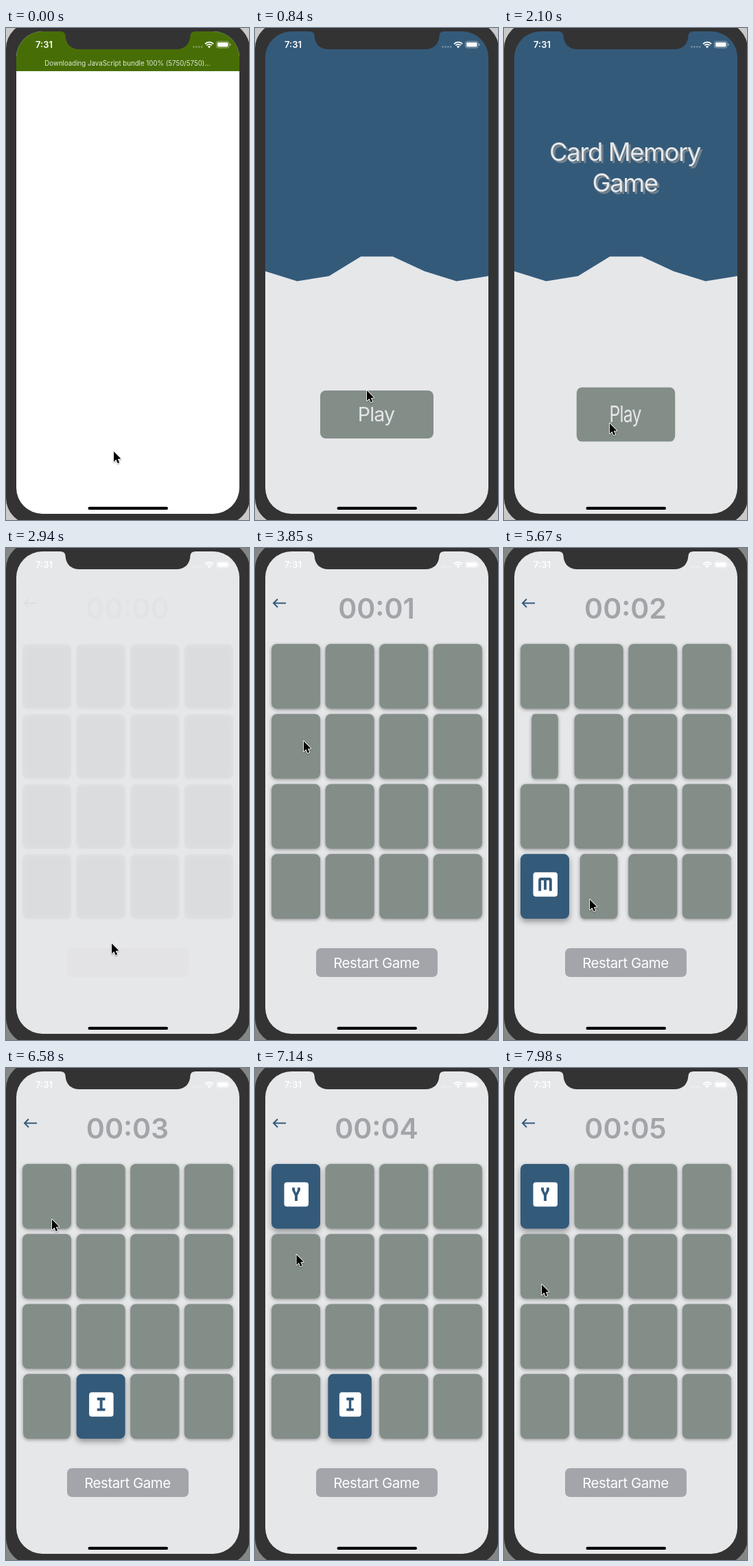
An HTML page with a canvas for the animation above (8 s loop, 354x718 px).

```html
<!DOCTYPE html>
<html lang="en">
<head>
<meta charset="utf-8">
<title>Card Memory Game</title>
<style>
html, body { margin: 0; width: 100%; height: 100%; overflow: hidden; background: #333334; }
canvas { display: block; width: 354px; height: 718px; }
</style>
</head>
<body>
<canvas id="stage"></canvas>
<script>
const W = 354, H = 718, LOOP = 8000;
const BLUE = '#345a7a', PALE = '#e6e7e9', SAGE = '#848e89', GRAY = '#a3a4a9', BEZEL = '#333334';
const canvas = document.getElementById('stage');
const dpr = window.devicePixelRatio || 1;
canvas.width = W * dpr;
canvas.height = H * dpr;
const c = canvas.getContext('2d');

const clamp = v => Math.min(1, Math.max(0, v));
const part = (t, from, length) => clamp((t - from) / length);
const easeInOut = p => p < .5 ? 2 * p * p : 1 - 2 * (1 - p) ** 2;
const easeOut = p => 1 - (1 - p) ** 3;

// time, x, y of the pointer tip
const POINTER = [
  [0, 157, 618], [140, 157, 618], [700, 163, 529], [980, 163, 529], [1640, 154, 577],
  [2940, 154, 577], [3700, 71, 282], [3960, 71, 282], [4600, 62, 505], [4800, 62, 505],
  [5400, 125, 513], [5750, 125, 513], [6500, 67, 221], [6750, 67, 221], [7500, 55, 316], [8000, 55, 316]
];
// progress, scaleX (scaleY is 2 - scaleX)
const RUBBER = [[0, 1], [.3, 1.25], [.4, .75], [.5, 1.15], [.65, .95], [.75, 1.05], [1, 1]];
const GLYPHS = {
  K: 'M9 7H11V11L13 7H15L12.5 12L15 17H13L11 13V17H9Z',
  M: 'M9 7A2 2 0 0 0 7 9V17H9V9H11V16H13V9H15V17H17V9A2 2 0 0 0 15 7Z',
  I: 'M9 7V9H11V15H9V17H15V15H13V9H15V7Z',
  Y: 'M9 7V9L11 13V17H13V13L15 9V7H13V9L12 11L11 9V7Z'
};
for (const k in GLYPHS) GLYPHS[k] = new Path2D(GLYPHS[k]);
const TURNS = [
  { col: 0, row: 1, glyph: 'K', at: 3870 },
  { col: 0, row: 3, glyph: 'M', at: 4680 },
  { col: 1, row: 3, glyph: 'I', at: 5505 },
  { col: 0, row: 0, glyph: 'Y', at: 6600 }
];
const FLIP = 500, SHOWN = 1500, TAP = 1671, GAME = 2660;

function track(keys, t, i, ease = p => p) {
  let n = 1;
  while (n < keys.length - 1 && keys[n][0] < t) n++;
  const a = keys[n - 1], b = keys[n];
  return a[i] + (b[i] - a[i]) * ease(part(t, a[0], b[0] - a[0]));
}

function box(x, y, w, h, r, fill) {
  c.beginPath();
  c.roundRect(x, y, w, h, r);
  c.fillStyle = fill;
  c.fill();
}

function label(str, x, y, size, fill, { weight = 400, align = 'center', gap = 0 } = {}) {
  c.font = `${weight} ${size}px Inter, "Open Sans", sans-serif`;
  c.letterSpacing = gap * size + 'px';
  c.textAlign = align;
  c.fillStyle = fill;
  c.fillText(str, x, y);
}

function shadow(color, blur, y, x = 0) {
  c.shadowColor = color;
  c.shadowBlur = blur * dpr;
  c.shadowOffsetX = x * dpr;
  c.shadowOffsetY = y * dpr;
}

function loading(t) {
  c.fillStyle = '#fff';
  c.fillRect(0, 0, W, H);
  c.globalAlpha = 1 - part(t, 280, 280);
  c.fillStyle = '#476e06';
  c.fillRect(0, 0, W, 63);
  label('Downloading JavaScript bundle 100% (5750/5750)...', 177, 55, 9.7, '#e2ead8');
  c.globalAlpha = 1;
}

function home(t) {
  c.fillStyle = BLUE;
  c.fillRect(0, 0, W, 380);
  c.beginPath();
  c.moveTo(15, H);
  [355, 369.5, 362, 333.5, 333.5, 355, 369.5, 362].forEach((y, i) => c.lineTo(15 + i * 325 / 7, y));
  c.lineTo(340, H);
  c.fillStyle = PALE;
  c.fill();

  if (t > 980) {
    const dy = -245 * (1 - easeOut(part(t, 980, 680)));
    c.save();
    shadow('#7b868d', 1, 3, 3);
    label('Card Memory', 176, 194 + dy, 36.5, PALE, { gap: -.04 });
    label('Game', 176, 239 + dy, 36.5, PALE, { gap: -.04 });
    c.restore();
  }

  const sx = track(RUBBER, part(t, TAP, 1000), 1);
  c.save();
  c.translate(177.5, 564);
  c.scale(sx, 2 - sx);
  box(-82.5, -35, 165, 70, 8, SAGE);
  label('Play', -1, 10, 28.5, PALE, { gap: -.03 });
  c.restore();
}

function card(col, row, t) {
  const turn = TURNS.find(k => k.col === col && k.row === row);
  let p = 0;
  if (turn) p = easeInOut(part(t, turn.at, FLIP)) - easeInOut(part(t, turn.at + SHOWN, FLIP));
  const open = p > .5;
  c.save();
  c.translate(59.5 + col * 78.6, 187.2 + row * 102.2);
  c.scale(Math.max(.01, Math.abs(Math.cos(p * Math.PI))), 1);
  shadow('rgba(0,0,0,.38)', open ? 9 : 5, open ? 4 : 1.5);
  box(-35.5, -47.2, 71, 94.4, 8, open ? BLUE : SAGE);
  shadow('transparent', 0, 0);
  if (open) {
    box(.5 - 17.5, -20.5, 35.5, 35.5, 4, '#fff');
    c.translate(.5, -3);
    c.scale(1.96, 1.96);
    c.translate(-12, -12);
    c.fillStyle = BLUE;
    c.fill(GLYPHS[turn.glyph]);
  }
  c.restore();
}

function game(t) {
  c.fillStyle = PALE;
  c.fillRect(0, 0, W, H);
  c.globalAlpha = part(t, 2900, 700);
  if (!c.globalAlpha) {
    c.globalAlpha = 1;
    return;
  }
  c.strokeStyle = BLUE;
  c.lineWidth = 2;
  c.beginPath();
  c.moveTo(45, 80.5);
  c.lineTo(27.5, 80.5);
  c.moveTo(33, 74.5);
  c.lineTo(27, 80.5);
  c.lineTo(33, 86.5);
  c.stroke();

  const secs = Math.floor((t - GAME) / 1020);
  label('00:0' + secs, 177, 103, 41, GRAY, { weight: 600 });
  for (let row = 0; row < 4; row++)
    for (let col = 0; col < 4; col++) card(col, row, t);
  box(89, 584, 177, 42, 7, '#a4a5ab');
  label('Restart Game', 177, 613, 20.4, '#fff', { gap: -.02 });
  c.globalAlpha = 1;
}

function statusBar() {
  label('7:31', 43, 29, 13, '#fff', { weight: 600, align: 'left' });
  c.fillStyle = 'rgba(255,255,255,.35)';
  for (let i = 0; i < 4; i++) {
    c.beginPath();
    c.arc(273.5 + i * 3.9, 27.5, 1.3, 0, 7);
    c.fill();
  }
  c.strokeStyle = '#fff';
  c.lineWidth = 1.8;
  for (const r of [8.3, 5.2]) {
    c.beginPath();
    c.arc(296, 29, r, -Math.PI * .76, -Math.PI * .24);
    c.stroke();
  }
  c.beginPath();
  c.moveTo(296, 29.3);
  c.arc(296, 29.3, 3, -Math.PI * .75, -Math.PI * .25);
  c.fillStyle = '#fff';
  c.fill();
  c.strokeStyle = 'rgba(255,255,255,.45)';
  c.lineWidth = 1;
  c.beginPath();
  c.roundRect(306.5, 19.5, 18.5, 9.5, 2.6);
  c.stroke();
  box(308, 21, 15.5, 6.5, 1.4, '#fff');
  box(326, 22.5, 1.4, 3.5, .7, 'rgba(255,255,255,.5)');
}

function notch() {
  c.beginPath();
  c.moveTo(79, 0);
  c.lineTo(79, 5);
  c.quadraticCurveTo(86, 5, 86.5, 11);
  c.bezierCurveTo(87, 24, 95, 31, 107, 31);
  c.lineTo(248, 31);
  c.bezierCurveTo(260, 31, 268, 24, 268.5, 11);
  c.quadraticCurveTo(269, 5, 276, 5);
  c.lineTo(276, 0);
  c.fillStyle = BEZEL;
  c.fill();
}

function pointer(t) {
  c.save();
  c.translate(track(POINTER, t, 1, easeInOut), track(POINTER, t, 2, easeInOut));
  c.beginPath();
  [[0, 0], [0, 15], [3.4, 11.8], [5.8, 17.2], [8.2, 16.1], [5.8, 10.9], [10.4, 10.6]]
    .forEach(([x, y]) => c.lineTo(x, y));
  c.closePath();
  shadow('rgba(0,0,0,.35)', 2, 1);
  c.strokeStyle = '#fff';
  c.lineWidth = 1.8;
  c.lineJoin = 'round';
  c.stroke();
  shadow('transparent', 0, 0);
  c.fillStyle = '#000';
  c.fill();
  c.restore();
}

function draw(t) {
  c.setTransform(dpr, 0, 0, dpr, 0, 0);
  c.fillStyle = t < GAME ? '#c9c9c9' : '#858686';
  c.fillRect(0, 0, W, H);
  box(0, -8, 355, 732, 38, BEZEL);
  c.save();
  c.beginPath();
  c.roundRect(15, 5, 325, 704, 38);
  c.clip();
  (t < 840 ? loading : t < GAME ? home : game)(t);
  statusBar();
  box(119.5, 698.8, 116.5, 4.2, 2.1, '#000');
  c.restore();
  notch();
  pointer(t);
}

const start = performance.now();
function tick(now) {
  draw(Math.max(0, now - start) % LOOP);
  requestAnimationFrame(tick);
}
requestAnimationFrame(tick);
</script>
</body>
</html>
```
